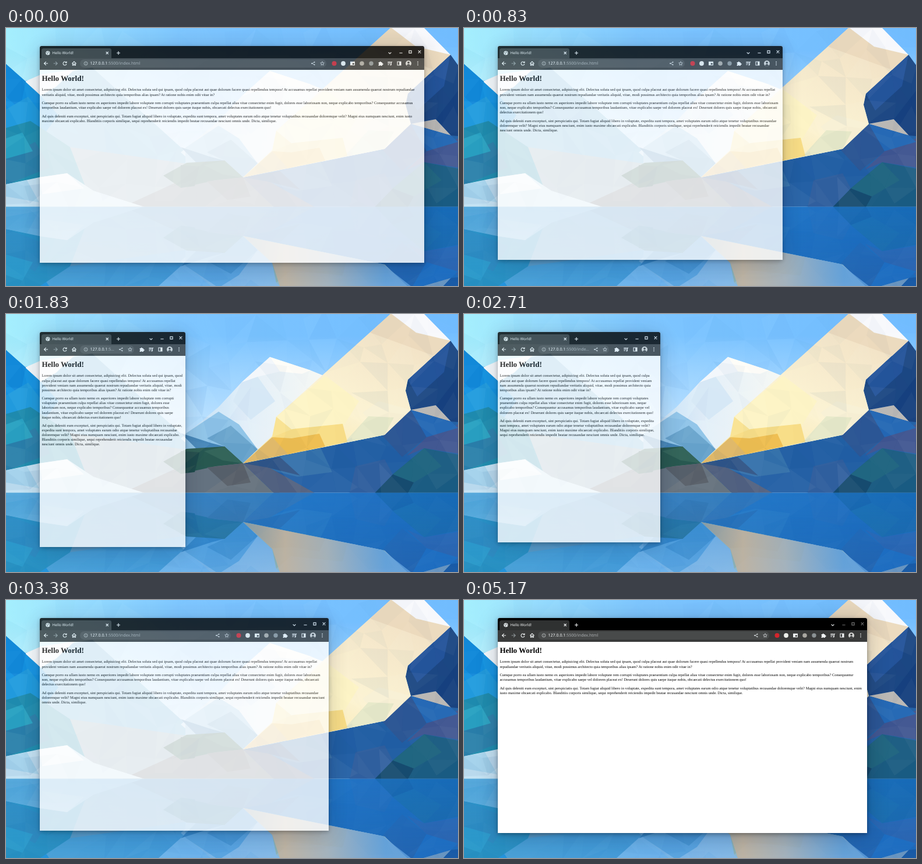
Recreate the animation shown at these times as an HTML page. Size 776 by 444 pixels, loop 5330 ms.

```html
<!DOCTYPE html>
<html lang="en">
<head>
<meta charset="utf-8">
<title>Hello World!</title>
<style>
html, body { margin: 0; width: 100%; height: 100%; overflow: hidden; background: #2a86d0; }
svg { position: absolute; top: 0; display: block; }
#stage { position: absolute; left: 0; top: 0; width: 776px; height: 444px; overflow: hidden; text-rendering: geometricPrecision; }
#win { position: absolute; left: 57.5px; top: 31px; border-radius: 3px 3px 0 0; background: #fff;
  box-shadow: 0 5px 36px rgba(0,10,30,.24), 0 2px 7px rgba(0,0,0,.34); }
#bars { position: absolute; inset: 0 0 auto 0; height: 40.5px; border-radius: 3px 3px 0 0; background: #000; overflow: hidden; }
#tool { position: absolute; inset: 20.5px 0 0 0; background: #393a3a; }
#tab { position: absolute; left: 3.5px; top: 4px; width: 120px; height: 17px; border-radius: 3.5px 3.5px 0 0; background: #2f3131; }
#pill { position: absolute; left: 69.5px; top: 23px; height: 14px; border-radius: 7px; background: #484a4a; }
.ui { position: absolute; font-family: "Noto Sans", sans-serif; line-height: 10px; color: #f4f6f7; white-space: nowrap; }
#name { left: 22px; top: 7px; font-size: 6.35px; }
#url { left: 87px; top: 25px; font-size: 7.06px; overflow: hidden; text-overflow: ellipsis; color: #a9adaf; }
#url b { font-weight: 400; color: #f4f6f7; }
#left { left: 0; }
#right { right: 0; }
#page { position: absolute; left: 3.9px; right: 3.75px; top: 40.5px; bottom: 0; overflow: hidden;
  font-family: "Liberation Serif", "Times New Roman", serif; font-size: 6.5px; line-height: 8.05px; color: #000; }
h1 { margin: 7.7px 0 8.3px; font-size: 13px; line-height: 16px; white-space: nowrap; }
p { margin: 0 0 6.7px; }
</style>
</head>
<body>
<div id="stage">
<svg width="776" height="444" viewBox="0 0 776 444">
  <defs>
    <linearGradient id="sky"><stop offset="0" stop-color="#a4effd"/><stop offset=".16" stop-color="#98deff"/><stop offset=".4" stop-color="#7cc5ff"/><stop offset="1" stop-color="#72bdff"/></linearGradient>
    <linearGradient id="haze" x2="0" y2="1"><stop offset=".12" stop-color="#fff" stop-opacity="0"/><stop offset=".75" stop-color="#e4f5ff" stop-opacity=".7"/></linearGradient>
    <linearGradient id="snow"><stop offset="0" stop-color="#b9dcf6"/><stop offset=".45" stop-color="#e2eff9"/><stop offset="1" stop-color="#f6f8f4"/></linearGradient>
    <linearGradient id="cream" x1=".1" y1=".9" x2=".8" y2="0"><stop offset="0" stop-color="#fbe9a6"/><stop offset=".4" stop-color="#fcf3d2"/><stop offset="1" stop-color="#f0dfc4"/></linearGradient>
    <linearGradient id="sand"><stop offset="0" stop-color="#b3a698" stop-opacity=".4"/><stop offset=".25" stop-color="#c2b3a0" stop-opacity=".9"/><stop offset=".5" stop-color="#a9b2ba" stop-opacity=".85"/><stop offset=".85" stop-color="#5f9fdc" stop-opacity=".8"/></linearGradient>
    <linearGradient id="deep"><stop offset="0" stop-color="#2f94d2"/><stop offset=".45" stop-color="#2485d8"/><stop offset="1" stop-color="#1770ca"/></linearGradient>
    <linearGradient id="fade" x2="0" y2="1"><stop offset="0" stop-color="#fff" stop-opacity=".74"/><stop offset="1" stop-color="#fff" stop-opacity=".5"/></linearGradient>
    <mask id="depth"><path fill="url(#fade)" d="M0 307.5H776V444H0Z"/></mask>
    <clipPath id="shore"><path d="M0 0H776V307.5H0Z"/></clipPath>
  </defs>
  <g id="land" clip-path="url(#shore)">
    <path fill="url(#sky)" d="M0 0H776V308H0Z"/>
    <path fill="url(#haze)" d="M0 0H776V308H0Z"/>
    <!-- left range -->
    <path fill="#63aeda" d="M28 92L148 68L335 237L300 308H0V120Z"/>
    <path fill="#f4f9fc" d="M28 94L60 80L118 71L86 101L57 118Z"/>
    <path fill="#1594e2" d="M0 62L57 114L90 150L60 190L0 200Z"/>
    <path fill="#128ada" d="M0 62L34 92L24 140L0 118Z"/>
    <path fill="#229cde" d="M0 140L38 118L70 160L40 200L0 190Z"/>
    <path fill="#1f8cae" d="M0 172L42 160L110 205L150 280L0 285Z"/>
    <path fill="#2b80aa" d="M0 222L50 196L76 240L0 270Z"/>
    <path fill="#2aa2c2" d="M0 190L28 180L46 212L0 225Z"/>
    <path fill="#8aa7b8" d="M110 205L335 237L407 257L470 308H150Z"/>
    <!-- snowy peak -->
    <path fill="url(#snow)" d="M300 214L365 160L404 118L453 74L523 97L545 106V240H330Z"/>
    <path fill="#fefdf8" d="M453 74L523 97L508 103L470 99Z"/>
    <path fill="#f3f7fb" d="M453 74L404 118L432 108L470 99Z"/>
    <path fill="#d6e8f6" d="M404 118L432 108L462 150L420 182L390 150Z"/>
    <path fill="#8fc4e8" d="M308 206L365 168L400 190L432 233H308Z"/>
    <path fill="#6aa5cd" d="M345 214L386 192L432 233L407 257L375 228Z"/>
    <path fill="#4586b8" d="M300 205L352 222L375 228L335 240Z"/>
    <!-- dark ridge -->
    <path fill="#68747f" d="M200 308L300 262L335 237L407 257L470 308Z"/>
    <path fill="#29594f" d="M270 254L310 232L375 228L407 257L360 262L300 275Z"/>
    <path fill="#356659" d="M340 236L375 228L407 257L372 252Z"/>
    <path fill="#1f4a48" d="M300 236L332 238L324 272L300 275Z"/>
    <path fill="#596069" d="M345 264L407 257L420 290L380 296Z"/>
    <path fill="#c4e2f3" d="M0 269L57 257L105 250L150 280L238 308H0Z"/>
    <path fill="#eef7fc" d="M57 257L105 250L134 276L62 286Z"/>
    <path fill="#a9d6ee" d="M0 269L36 262L57 300L0 290Z"/>
    <!-- right range -->
    <path fill="#225fa4" d="M763 46L776 64V308H460L407 257L650 208L695 165L686 132L690 113Z"/>
    <path fill="#1c4783" d="M763 46L776 64V112L738 157L695 165L686 132L690 113Z"/>
    <path fill="#24549a" d="M763 46L752 100L706 142L690 113Z"/>
    <path fill="#b9b7b4" d="M695 165L738 157L764 185Z"/>
    <path fill="#16407e" d="M738 157L776 108V186L764 185Z"/>
    <path fill="#2d5795" d="M646 209L695 165L722 212L680 246Z"/>
    <path fill="#3f5590" d="M722 212L776 190V240L718 231L688 244Z"/>
    <path fill="#2468b4" d="M695 165L764 185L776 196L722 212Z"/>
    <path fill="#1b5c82" d="M633 308L664 276L718 231L776 242V308Z"/>
    <path fill="#1f6580" d="M718 231L748 262L700 290L664 276Z"/>
    <path fill="#154a6e" d="M633 308L664 276L700 290L690 308Z"/>
    <path fill="#3370aa" d="M407 257L540 230L560 272L500 280Z"/>
    <path fill="#52617f" d="M407 257L448 262L530 308H460Z"/>
    <path fill="#2f5486" d="M407 257L470 246L505 278L448 264Z"/>
    <path fill="#305f9e" d="M600 262L650 250L664 276L633 308H590Z"/>
    <!-- sunlit peak -->
    <path fill="url(#cream)" d="M407 257L457 210L464 177L528 119L660 0H685L763 46L690 113L686 132L695 165L650 208Z"/>
    <path fill="#ecdabd" d="M660 0L625 32L680 52L735 72L763 46Z"/>
    <path fill="#f8f9fc" d="M662 0H718L763 46L704 32Z"/>
    <path fill="#fdf4c5" d="M464 177L548 106L606 150L580 192L492 200Z"/>
    <path fill="#f8f0d4" d="M650 208L612 170L640 150L695 165Z"/>
    <path fill="#e6e8c8" d="M580 222L622 176L666 178L650 208Z"/>
    <path fill="#f9e393" d="M464 177L492 200L457 212Z"/>
    <path fill="#f8dd86" d="M457 212L492 198L578 189L586 220L540 230Z"/>
    <path fill="#efbe50" d="M457 212L490 214L538 206L548 228L482 242Z"/>
    <path fill="#dfb868" d="M407 257L457 212L484 241Z"/>
    <g id="facets"></g>
  </g>
  <use href="#land" transform="translate(0 615) scale(1 -1)"/>
  <path fill="url(#deep)" mask="url(#depth)" d="M0 307.5H776V444H0Z"/>
  <path fill="url(#sand)" d="M407 358L520 381L646 406L695 444H470L457 404Z"/>
</svg>

<div id="win">
  <div id="bars">
    <div id="tool"></div><div id="tab"></div><div id="pill"></div>
    <div id="name" class="ui">Hello World!</div>
    <div id="url" class="ui"><b>127.0.0.1</b>:5500/index.html</div>
    <svg id="left" width="150" height="41" fill="none" stroke="#f2f4f5" stroke-width="1.1">
      <circle cx="13.8" cy="12" r="3.6" fill="#e8eced" stroke="none"/>
      <path stroke="#465054" stroke-width=".9" d="M11.2 10.8L13.4 12.2L12.8 14.6M14.2 9.2L14.6 11L16.6 12.4"/>
      <path d="M113.7 10L117.7 14M117.7 10L113.7 14M132 12H138M135 9V15"/>
      <path d="M14 30H7.6M10.7 26.8L7.5 30L10.7 33.2"/>
      <path stroke="#8d9497" d="M23.6 30H30M27 26.8L30.2 30L27 33.2"/>
      <path d="M45.4 28.2A3 3 0 1 0 45.9 30.8M46 26.4V28.8H43.5"/>
      <path d="M55.3 30.2L58.9 26.8L62.5 30.2M56.4 29.6V33.2H58V30.9H59.8V33.2H61.4V29.6"/>
      <g stroke="#d2d7d9" stroke-width=".7"><circle cx="79" cy="30" r="3"/><path d="M79 29.6V31.6M79 28.3V29"/></g>
    </svg>
    <svg id="right" width="210" height="41" viewBox="-210 0 210 41" fill="none" stroke="#f2f4f5" stroke-width="1.1">
      <path d="M-61.3 11L-59 13.3L-56.7 11"/>
      <g id="caps"><path d="M-42.6 12H-37.4M-10.3 7.7L-5.7 12.3M-5.7 7.7L-10.3 12.3"/><path d="M-26.1 8.1H-21.9V12.1H-26.1Z"/></g>
      <g id="mark" stroke="#d6dadc" stroke-width=".8">
        <path d="M-188.6 27.9L-192.7 30L-188.6 32.1"/>
        <g fill="#d6dadc" stroke="none"><circle cx="-188.5" cy="27.8" r="1"/><circle cx="-193" cy="30" r="1"/><circle cx="-188.5" cy="32.2" r="1"/></g>
        <path id="star"/>
      </g>
      <g id="exts" stroke="none">
        <circle cx="-154.5" cy="30" r="4" fill="#d3252c"/>
        <circle cx="-139" cy="30" r="3.9" fill="#eceeea"/>
        <path fill="#eef1f2" fill-rule="evenodd" d="M-127 26.8H-119V33.2H-127ZM-123.2 29.6V32H-120.2V29.6Z"/>
        <circle cx="-107" cy="30" r="3.8" fill="#a9a7a1"/>
        <circle cx="-91" cy="30" r="3.7" fill="#8b9294"/>
      </g>
      <path fill="#f2f4f5" stroke="none" d="M-78.4 28H-76.6A1.3 1.3 0 1 1 -74 28H-72.2V29.9A1.3 1.3 0 1 1 -72.2 32.3V34H-74.2A1.2 1.2 0 0 0 -76.5 34H-78.4V32A1.2 1.2 0 0 0 -78.4 29.8Z"/>
      <path d="M-62.7 27.6H-57.5M-62.7 29.8H-57.5M-62.7 32H-60M-56.6 32.2V27.5H-54.9"/><circle cx="-57.5" cy="32.4" r="1.1" fill="#f2f4f5" stroke="none"/>
      <path d="M-46 27H-40V33H-46Z"/><path fill="#f2f4f5" stroke="none" d="M-42.8 27H-40V33H-42.8Z"/>
      <g stroke="none"><circle cx="-27" cy="30" r="5" fill="#d4d4d2"/><circle cx="-27" cy="28.6" r="1.8" fill="#3a3c3d"/><path fill="#3a3c3d" d="M-30.4 33.6Q-27 28.4 -23.6 33.6Q-27 36.2 -30.4 33.6Z"/></g>
      <g fill="#f2f4f5" stroke="none"><circle cx="-11" cy="27.4" r=".8"/><circle cx="-11" cy="30" r=".8"/><circle cx="-11" cy="32.6" r=".8"/></g>
    </svg>
  </div>
  <div id="page">
    <h1>Hello World!</h1>
    <p>Lorem ipsum dolor sit amet consectetur, adipisicing elit. Delectus soluta sed qui ipsam, quod culpa placeat aut quae dolorum facere quasi repellendus tempora! At accusamus repellat provident veniam nam assumenda quaerat nostrum repudiandae veritatis aliquid, vitae, modi possimus architecto quia temporibus alias ipsam? At ratione nobis enim odit vitae in?</p>
    <p>Cumque porro ea ullam iusto nemo ex asperiores impedit labore voluptate rem corrupti voluptates praesentium culpa repellat alias vitae consectetur enim fugit, dolores esse laboriosam non, neque explicabo temporibus? Consequuntur accusamus temporibus laudantium, vitae explicabo saepe vel dolorem placeat ex! Deserunt dolores quis saepe itaque nobis, obcaecati delectus exercitationem quo!</p>
    <p>Ad quis deleniti eum excepturi, sint perspiciatis qui. Totam fugiat aliquid libero in voluptate, expedita sunt tempora, amet voluptates earum odio atque tenetur voluptatibus recusandae doloremque velit? Magni eius numquam nesciunt, enim iusto maxime obcaecati explicabo. Blanditiis corporis similique, sequi reprehenderit reiciendis impedit beatae recusandae nesciunt omnis unde. Dicta, similique.</p>
  </div>
</div>
</div>
<script>
const $ = id => document.getElementById(id);
const clamp = (v, a, b) => Math.min(b, Math.max(a, v));
const LOOP = 5330;
const GLASS = .8;

// Bursts of redraws: first, last, count
const BURSTS = [[290, 790, 11], [830, 1000, 5], [1460, 1830, 8], [2460, 2960, 9],
  [3000, 3500, 12], [3540, 4040, 11], [4210, 4500, 6]];
// Window size: time, width, height
const SIZES = [[0, 660.5, 373], [240, 660.5, 373], [540, 590, 371], [830, 489.5, 367.5],
  [1000, 440, 368], [1410, 440, 368], [1830, 250, 370], [2410, 250, 370], [2560, 256, 367],
  [2710, 279, 361.5], [2960, 348, 363], [3380, 503, 366.5], [3540, 550, 368],
  [4040, 633, 371], [4210, 634.5, 370], [LOOP, 634.5, 370]];

function drawFacets() {
  let seed = 11, out = "";
  const rnd = () => (seed = seed * 16807 % 2147483647) / 2147483647;
  const step = 44, cols = 19, rows = 8;
  const pts = Array.from({ length: cols * rows }, (_, i) =>
    [(i % cols - .3 + .6 * (rnd() - .5)) * step, (Math.floor(i / cols) + .6 * (rnd() - .5)) * step]);
  for (let r = 0; r < rows - 1; r++) for (let c = 0; c < cols - 1; c++) {
    const i = r * cols + c, a = pts[i], b = pts[i + 1], d = pts[i + cols], e = pts[i + cols + 1];
    const halves = rnd() < .5 ? [[a, b, d], [b, e, d]] : [[a, b, e], [a, e, d]];
    for (const tri of halves) {
      const fill = rnd() < .6 ? "#fff" : "#03428c";
      const depth = .03 + .006 * r;
      out += `<polygon points="${tri}" fill="${fill}" opacity="${(rnd() * depth).toFixed(3)}"/>`;
    }
  }
  $("facets").innerHTML = out;
}

function drawStar() {
  const pts = Array.from({ length: 10 }, (_, i) => {
    const r = i % 2 ? 1.6 : 3.5, a = i * Math.PI / 5;
    return (-175 + r * Math.sin(a)).toFixed(2) + " " + (30.2 - r * Math.cos(a)).toFixed(2);
  });
  $("star").setAttribute("d", "M" + pts.join("L") + "Z");
}

function snap(t) {
  let last = 0;
  for (const [from, to, n] of BURSTS) {
    if (t < from) break;
    const gap = (to - from) / (n - 1);
    last = Math.min(to, from + Math.floor((t - from) / gap + 1e-6) * gap);
  }
  return last;
}

function sizeAt(t) {
  const i = SIZES.findIndex(s => s[0] > t), a = SIZES[i - 1], b = SIZES[i];
  const k = (t - a[0]) / (b[0] - a[0]);
  return [a[1] + (b[1] - a[1]) * k, a[2] + (b[2] - a[2]) * k];
}

function alphaAt(t, s) {
  if (t < 40) return GLASS + .03;
  return GLASS + (1 - GLASS) * clamp((s - 4152) / 348, 0, 1);
}

function draw(t) {
  const s = snap(t), [w, h] = sizeAt(s);
  const shown = clamp(Math.floor((w - 282.5) / 16), 0, 5), shift = 16 * (5 - shown);
  const win = $("win").style;
  win.width = w + "px";
  win.height = h + "px";
  win.opacity = alphaAt(t, s);
  $("pill").style.right = 168 - shift + "px";
  $("url").style.right = 199 - shift + "px";
  const move = `translate(${shift} 0)`;
  $("mark").setAttribute("transform", move);
  $("exts").setAttribute("transform", move);
  [...$("exts").children].forEach((el, i) => el.setAttribute("visibility", i < shown ? "visible" : "hidden"));
  $("caps").setAttribute("stroke", t >= 5170 ? "#777" : "#f2f4f5");
}

drawFacets();
drawStar();
const start = performance.now();
function tick() {
  draw((performance.now() - start) % LOOP);
  requestAnimationFrame(tick);
}
tick();
</script>
</body>
</html>
```
